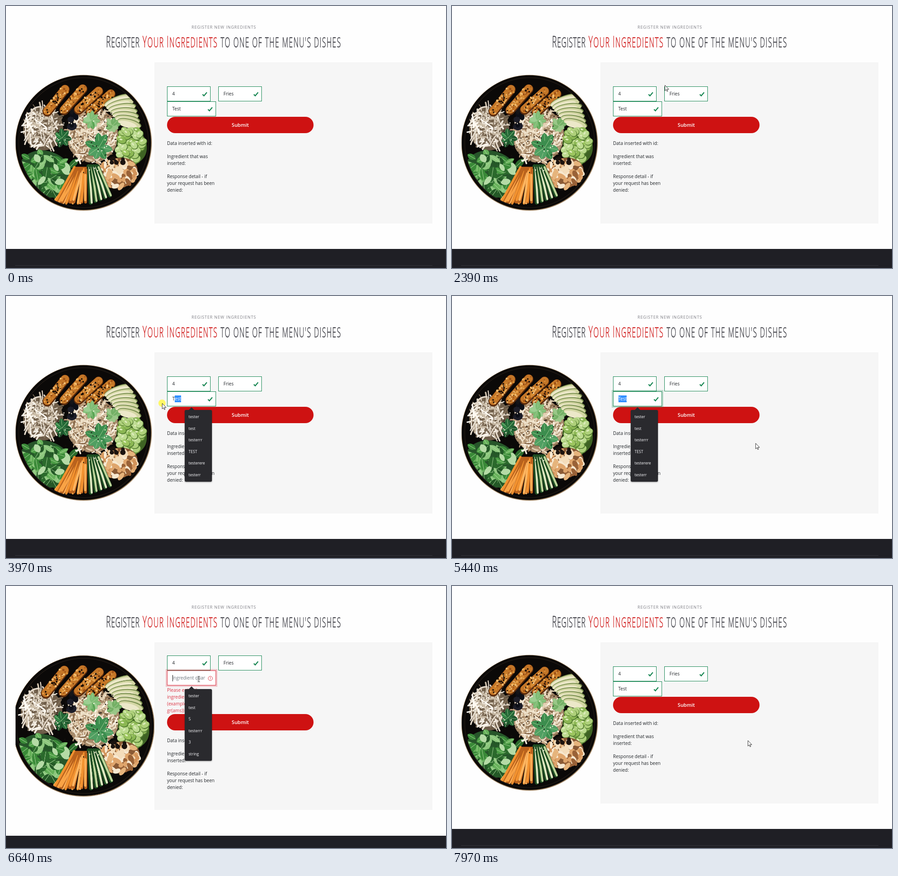
Animation, 970 px wide and 577 px high, one loop 8000 ms. Source, as an HTML page with a canvas:

```html
<!DOCTYPE html>
<html lang="en">
<head>
<meta charset="utf-8">
<title>Register ingredients</title>
<style>
html, body { margin: 0; width: 100%; height: 100%; overflow: hidden; }
#stage {
  position: relative; width: 970px; height: 577px; overflow: hidden;
  background: #fefefe; color: #212529; font: 10px/15px "Open Sans", sans-serif;
  --green: #198754; --red: #dc3545;
  --up: 0px; --down: 0px; --grow: 0px;
}
#stage.tall { --up: -24px; --down: 38.4px; --grow: 14.4px; }
#stage div, #stage svg, canvas { position: absolute; }
#stage svg { left: 0; top: 0; overflow: visible; }
#stage .eyebrow {
  left: 409px; top: 39px; white-space: nowrap; color: #7f7f86;
  font-size: 9px; letter-spacing: .85px;
}
.title { font: 300 31px "Open Sans", sans-serif; fill: #37373f; stroke: #37373f; stroke-width: .5px; }
.title .accent { fill: #ce1212; stroke: #ce1212; }
.title .cap { font-size: 35px; }
.plate { left: 20.5px; top: 124px; width: 306.5px; height: 369px; overflow: hidden; }
.plate canvas { left: -4.5px; top: 22px; width: 310px; height: 310px; }
.tall .plate canvas { transform: translateY(7px) scale(1.04); }
.panel { left: 327px; top: 124px; width: 613px; height: calc(355px + var(--grow)); background: #f6f6f6; }
.footer { left: 0; top: calc(535.45px + var(--grow)); width: 970px; height: 60px; background: #1f1f25; }
.footer::after { content: ""; position: absolute; left: 20px; top: 36px; width: 920px; height: 1px; background: #34343b; }
.upper { top: var(--up); }
.lower { top: var(--down); }
.field {
  top: 177px; width: 94px; height: 31px; line-height: 31px;
  border: 1px solid var(--tone, var(--green)); background: #fff;
}
.field span { position: absolute; left: 10.5px; white-space: pre; }
.field svg { fill: none; stroke: var(--tone, var(--green)); }
#stage .tick { left: auto; right: 6px; top: 10px; width: 12px; height: 12px; }
#stage .alert { left: auto; right: 6.5px; top: 10.5px; width: 11px; height: 11px; display: none; }
#amount { left: 355px; top: 210px; width: 106px; }
.tall #amount { --tone: var(--red); }
.tall #amount .tick, #hint, #error, .beam, #caret { display: none; }
.tall #amount .alert, .tall #hint, .tall #error { display: block; }
#glow { inset: -4px; border: 3px solid var(--tone, var(--green)); }
#hint { width: 72px; overflow: hidden; color: #6c757d; }
#value mark { display: inline-block; line-height: 15px; background: #3390ff; color: #fff; }
#caret { top: 9px; width: 1px; height: 14px; background: #111; }
#error { left: 355px; top: 222px; color: var(--red); white-space: pre; }
.submit {
  left: 355px; top: 243.5px; width: 323px; height: 36.5px; border-radius: 19px;
  background: #ce1212; color: #fff; text-align: center; font-weight: 600; font-size: 11px; line-height: 36.5px;
}
.note { left: 355px; white-space: pre; }
#menu {
  left: 394px; top: 251px; width: 59.5px; height: 158px; border-radius: 3px;
  background: #2a2a2e; box-shadow: 0 1px 3px #0006; color: #fbfbfe; font-size: 8.6px;
}
#menu::before {
  content: ""; position: absolute; left: 9px; top: -6px;
  border: solid transparent; border-width: 0 6px 6px; border-bottom-color: #2a2a2e;
}
#menu p { margin: 0; padding-left: 8.5px; height: 25.5px; line-height: 31px; }
.pointer { left: 0; top: 0; animation: wander 8s ease-in-out infinite; }
#ring { left: -8px; top: -8px; width: 16px; height: 16px; border-radius: 50%; background: #fff84ed9; animation: press 8s step-end infinite; }
.typing .beam { display: block; }
.typing .arrow { display: none; }
@keyframes wander {
  0% { transform: translate(942px, 580px); }
  .875% { transform: translate(937px, 568px); }
  8% { transform: translate(362px, 290px); }
  10.875%, 11.625% { transform: translate(466px, 357px); }
  17% { transform: translate(535px, 168px); }
  20.75% { transform: translate(558px, 185px); }
  25.5% { transform: translate(415px, 198px); }
  28% { transform: translate(440px, 157px); }
  29.875% { transform: translate(469px, 174px); }
  33.125% { transform: translate(522px, 190px); }
  37.5% { transform: translate(303px, 146px); }
  43% { transform: translate(498px, 166px); }
  46.5% { transform: translate(390px, 229px); }
  49.625% { transform: translate(344px, 236px); }
  51.25% { transform: translate(303px, 238px); }
  53.875%, 57.25% { transform: translate(357px, 232px); }
  63% { transform: translate(758px, 300px); }
  67.125%, 72.5% { transform: translate(669px, 324px); }
  78% { transform: translate(430px, 172px); }
  79.8%, 90% { transform: translate(425px, 205px); }
  95%, 96.5% { transform: translate(656px, 347px); }
  99.625%, 100% { transform: translate(652px, 340px); }
}
@keyframes press {
  0%, 53.125%, 72.5%, 81%, 98.1% { opacity: 0; }
  46.5%, 71%, 79.8%, 95.5% { opacity: 1; }
}
</style>
</head>
<body>
<div id="stage">
  <div class="eyebrow">REGISTER NEW INGREDIENTS</div>
  <svg class="title" width="970" height="120">
    <text transform="translate(220.5 91) scale(.5 1)" letter-spacing="1.5"><tspan class="cap">R</tspan>EGISTER</text>
    <text class="accent" transform="translate(301 91) scale(.5 1)" letter-spacing="3.1"><tspan class="cap">Y</tspan>OUR <tspan class="cap">I</tspan>NGREDIENTS</text>
    <text transform="translate(473 91) scale(.5 1)" letter-spacing="3">TO ONE OF THE MENU'S DISHES</text>
  </svg>
  <div class="plate"><canvas id="dish" width="620" height="620"></canvas></div>
  <div class="panel"></div>
  <div class="footer"></div>

  <div class="lower">
    <div class="submit">Submit</div>
    <div class="note" style="top:295px">Data inserted with id:</div>
    <div class="note" style="top:324px">Ingredient that was
inserted:</div>
    <div class="note" style="top:368px">Response detail - if
your request has been
denied:</div>
  </div>
  <div id="error">Please enter the
ingredient amount
(example: 100
gr(ams))</div>

  <div class="upper">
    <div class="field" style="left:355px"><span>4</span></div>
    <div class="field" style="left:468px"><span>Fries</span></div>
    <div class="field" id="amount">
      <div id="glow"></div>
      <span id="hint">Ingredient quantity</span>
      <span id="value"></span>
      <div id="caret"></div>
      <svg class="alert" viewBox="0 0 11 11"><circle cx="5.5" cy="5.5" r="4.7"/><path d="M5.5 2.8V6.1M5.5 7.2V8.3"/></svg>
    </div>
    <div id="menu"></div>
  </div>

  <div class="pointer" id="pointer">
    <div id="ring"></div>
    <svg class="arrow" width="10" height="15"><path d="M.4.4V12.6L3.2 10 5 14.2 6.8 13.4 5 9.4H9Z" fill="#fff" stroke="#222" stroke-width=".9"/></svg>
    <svg class="beam" width="1" height="1"><path d="M-2.5-6H-.6L0-5.4.6-6H2.5M0-5.4V5.4M-2.5 6H-.6L0 5.4.6 6H2.5" fill="none" stroke="#222"/></svg>
  </div>
</div>

<script>
const el = id => document.getElementById(id);

for (const field of document.querySelectorAll('.field'))
  field.insertAdjacentHTML('beforeend',
    '<svg class="tick" viewBox="0 0 12 12"><path d="M1.3 6.6 4.4 9.7 10.8 2.3" stroke-width="2.3"/></svg>');

// ---- the dish ----
const ctx = el('dish').getContext('2d');
let seed = 11;
const random = () => (seed = seed * 16807 % 2147483647) / 2147483647;
const rnd = (a, b) => a + (b - a) * random();
const pick = text => { const list = text.split(' '); return list[Math.floor(random() * list.length)]; };

function blob(color, x, y, rx, ry = rx, turn = 0) {
  ctx.fillStyle = color;
  ctx.beginPath();
  ctx.ellipse(x, y, rx, ry, turn, 0, 7);
  ctx.fill();
}
function strip(color, width, x1, y1, x2, y2, bend = 0) {
  ctx.strokeStyle = color;
  ctx.lineWidth = width;
  ctx.beginPath();
  ctx.moveTo(x1, y1);
  ctx.quadraticCurveTo((x1 + x2) / 2 + bend, (y1 + y2) / 2 + bend, x2, y2);
  ctx.stroke();
}
function leaf(color, x, y, length, width, turn, vein) {
  ctx.save();
  ctx.translate(x, y);
  ctx.rotate(turn);
  ctx.fillStyle = color;
  ctx.beginPath();
  ctx.moveTo(0, 0);
  ctx.bezierCurveTo(length * .2, -width, length * .8, -width, length, 0);
  ctx.bezierCurveTo(length * .8, width, length * .2, width, 0, 0);
  ctx.fill();
  if (vein) strip(vein, .8, 0, 0, length * .9, 0);
  ctx.restore();
}
function scatter(count, cx, cy, rx, ry, draw) {
  for (let i = 0; i < count; i++) {
    const angle = rnd(0, 6.28), reach = Math.sqrt(random());
    draw(cx + rx * reach * Math.cos(angle), cy + ry * reach * Math.sin(angle));
  }
}
function threads(count, cx, cy, rx, ry, colors, size) {
  scatter(count, cx, cy, rx, ry, (x, y) => {
    const a = rnd(0, 6.28), dx = size * Math.cos(a), dy = size * Math.sin(a);
    strip(pick(colors), rnd(1.8, 3.6), x - dx, y - dy, x + dx, y + dy, rnd(-9, 9));
  });
}
function sprig(x, y, count, length, width, colors) {
  for (let i = 0; i < count; i++)
    leaf(pick(colors), x, y, length * rnd(.8, 1.1), width, i * 6.28 / count + rnd(-.2, .2), '#a6cf96');
}

function drawDish() {
  ctx.scale(2, 2);
  ctx.translate(-16, -146);
  ctx.lineCap = 'round';
  blob('#a08462', 171, 301.3, 150.5, 149.5);
  blob('#0b0908', 170.6, 300.8, 149.2, 148.3);
  ctx.strokeStyle = '#2a211a';
  ctx.beginPath();
  ctx.arc(171, 301, 143, 0, 7);
  ctx.stroke();
  ctx.save();
  ctx.beginPath();
  ctx.arc(171, 301, 142, 0, 7);
  ctx.clip();

  blob('#6d5c48', 82, 270, 44, 48);
  threads(115, 80, 268, 38, 46, '#f2ebdf #e3d8c9 #fffaf2 #cbbda8 #7d6b56', 14);

  blob('#27562a', 88, 370, 62, 50, .4);
  scatter(95, 88, 368, 56, 47, (x, y) =>
    leaf(pick('#2b6a2c #3a8a38 #4c9d45 #66b15a #8cc77d #235826 #b5dba6'), x, y, rnd(14, 30), rnd(6, 13), rnd(0, 6.28), '#b4dba2'));

  blob('#a88c6c', 190, 285, 57, 60);
  threads(210, 188, 284, 54, 60, '#f3e8d6 #e4d2b6 #fff8ea #c5a684 #eee0c8 #8a6b4c', 10);
  scatter(8, 148, 250, 10, 22, (x, y) => blob(pick('#0d0f17 #1c1d28 #151518'), x, y, rnd(6, 10), rnd(5, 9), rnd(0, 3)));

  for (const [x1, y1, x2, y2] of [[91, 231, 130, 183], [128, 228, 169, 182], [160, 227, 204, 187], [186, 232, 231, 193]]) {
    strip('#5a2a0c', 21, x1, y1 + 2, x2, y2 + 1);
    strip('#c47627', 18, x1, y1, x2, y2);
    for (let i = 0; i < 60; i++) {
      const f = random();
      blob(pick('#e8a54c #9a4d14 #f2bf74 #d58a30 #1c1009'), x1 + (x2 - x1) * f + rnd(-7, 7), y1 + (y2 - y1) * f + rnd(-7, 7), rnd(.8, 2.6));
    }
  }

  for (let i = 0; i < 7; i++) {
    const x = 247 + i * 4, y = 208 + i * 8.5, turn = -.35 + i * .1;
    blob('#7b9150', x + 1, y - 1, 33 - i, 9.5, turn);
    blob('#d3d6a4', x, y + .5, 32 - i, 9, turn);
    blob('#ece8c9', x - 3, y + 2, 27 - i, 7, turn);
  }

  blob('#3f6324', 277, 308, 33, 39, -.3);
  scatter(48, 276, 307, 31, 37, (x, y) => {
    const turn = rnd(-1, 1);
    blob('#567f33', x + .8, y + 1, 9.5, 7.4, turn);
    blob(pick('#9cc55f #aed07a #8bb753 #bddb90'), x, y, 8.8, 6.6, turn);
    blob('#dcecba', x - 2, y - 2, 3.5, 1.8, turn);
  });

  blob('#8a5a35', 248, 368, 43, 33, -.3);
  scatter(85, 246, 368, 41, 31, (x, y) =>
    blob(pick('#e6b47c #f4ddbb #d3935a #f7e8d0 #dfa56c #9a6237'), x, y, rnd(4, 11), rnd(3, 6), rnd(0, 3)));
  scatter(7, 246, 340, 22, 8, (x, y) => blob('#1b130f', x, y, rnd(3, 6)));

  for (let i = 0; i < 5; i++) {
    const x1 = 182 + i * 5, x2 = 187 + i * 10.5, y2 = 433 - i * 4;
    strip('#1d4d22', 9, x1, 353, x2, y2);
    strip(pick('#dfe8c0 #c0d79c #eef2dc'), 4.5, x1 + 2, 355, x2 + 2, y2);
  }
  for (let i = 0; i < 18; i++) {
    const x1 = 151 + i % 9 * 3, x2 = 109 + i % 9 * 8 + rnd(-2, 2);
    strip('#b9621d', 6, x1 + 1, 357, x2 + 1, 432);
    strip(pick('#f9a345 #f2922f #ffb660 #fbac55'), 5, x1, rnd(354, 375), x2, rnd(423, 435));
  }

  sprig(188, 252, 9, 22, 7, '#5aa554 #7fbd75 #9bce91');
  sprig(235, 263, 9, 18, 7, '#74b066 #98c686 #afd5a0');
  sprig(124, 290, 7, 21, 8, '#246937 #338546 #1d552c');
  sprig(205, 311, 7, 32, 11, '#27733b #3c8d4e #509f62 #205e32');
  scatter(100, 178, 285, 70, 85, (x, y) => blob(pick('#16110e #fff6e4 #16110e'), x, y, 1.6, 1, rnd(0, 3)));
  ctx.restore();
}
drawDish();

// ---- the form over time ----
const LOOP = 8000, CLEARED = 5580, TYPED = [6900, 6990, 7060, 7130], SELECTED = [3880, 3910, 3940, 4040];
const BLURRED = 5700, REFOCUSED = 6400, LEFT = 7720;
const BEAM = [[1480, 1880], [1930, 2150], [2500, 2730], [3620, 3920], [4290, 4640], [6190, 6900]];
const SHORT_LIST = ['tester', 'test', 'testerrr', 'TEST', 'testerere', 'testerr'];
const FULL_LIST = ['tester', 'test', '5', 'testerrr', '3', 'string'];
const within = (t, from, to) => t >= from && t < to;
const passed = (times, t) => times.filter(time => t >= time).length;
const clamp = v => Math.max(0, Math.min(1, v));
const fade = (t, from, to) => clamp((t - from) / 150) * clamp((to + 150 - t) / 150);
const setHtml = (node, html) => { if (node.shown !== html) node.innerHTML = node.shown = html; };

function render(t) {
  const cleared = within(t, CLEARED, TYPED[0]);
  const length = t < CLEARED ? 4 : passed(TYPED, t);
  const text = 'Test'.slice(0, length);
  const split = t < CLEARED ? 4 - passed(SELECTED, t) : length;
  el('stage').classList.toggle('tall', cleared);
  setHtml(el('value'), text.slice(0, split) + (split < length ? `<mark>${text.slice(split)}</mark>` : ''));

  const typing = within(t, CLEARED, BLURRED) || within(t, REFOCUSED, 7600);
  const blinkOn = Math.floor((t - REFOCUSED) / 530) % 2 === 0;
  el('caret').style.display = typing && blinkOn ? 'block' : 'none';
  el('caret').style.left = 11 + el('value').offsetWidth + 'px';
  el('glow').style.opacity = .25 * Math.max(fade(t, 4000, BLURRED), fade(t, REFOCUSED, LEFT));

  const open = within(t, 3760, CLEARED) || t >= REFOCUSED;
  setHtml(el('menu'), (cleared ? FULL_LIST : SHORT_LIST).map(word => `<p>${word}</p>`).join(''));
  el('menu').style.opacity = open ? clamp((7780 - t) / 80) : 0;
  el('pointer').classList.toggle('typing', BEAM.some(([from, to]) => within(t, from, to)));
}

let start;
function tick(now) {
  start ??= now;
  render((now - start) % LOOP);
  requestAnimationFrame(tick);
}
render(0);
requestAnimationFrame(tick);
</script>
</body>
</html>
```
